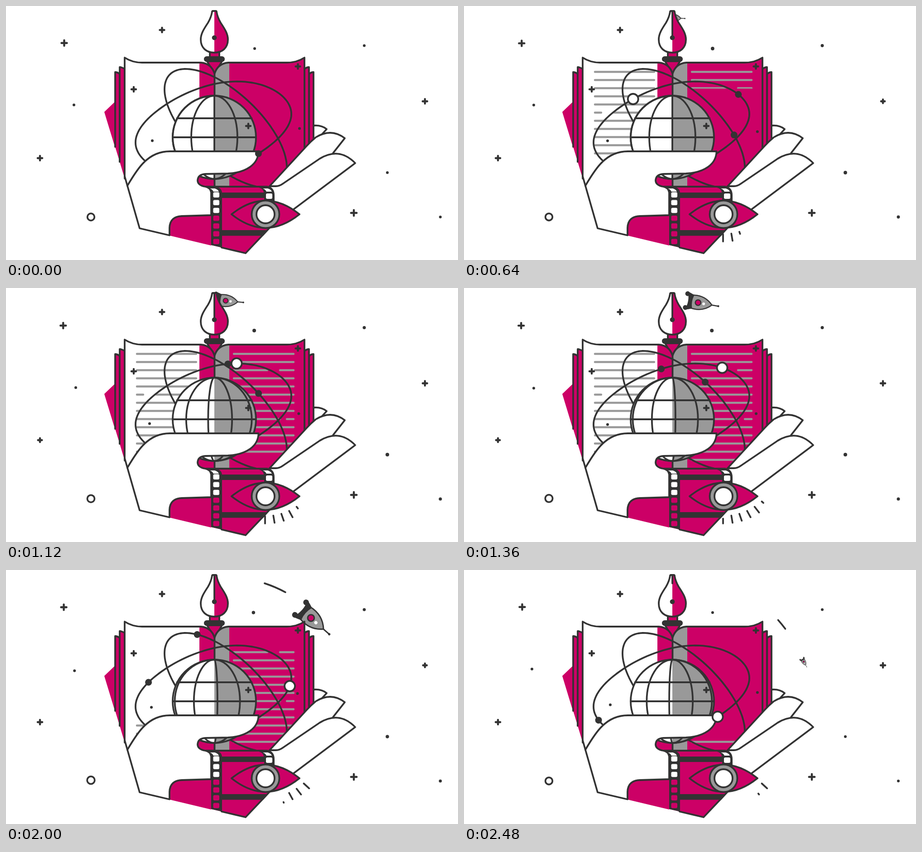
Recreate the animation shown at these times as an HTML page. Size 998 by 561 pixels, loop 2.56 s.

```html
<!DOCTYPE html>
<html lang="en">
<head>
<meta charset="utf-8">
<title>Book, globe and rocket</title>
<style>
html, body { margin: 0; width: 100%; height: 100%; overflow: hidden; background: #fff; }
svg { display: block; width: 100vw; height: 100vh; }
.m { fill: #c06; } .w { fill: #fff; } .g { fill: #999; } .d { fill: #333; }
.s { stroke: #333; stroke-width: 3.8; stroke-linecap: round; stroke-linejoin: round; }
.n { fill: none; }
.text { fill: none; stroke: #999; stroke-width: 4.4; stroke-linecap: round; }
</style>
</head>
<body>
<svg viewBox="0 0 998 561">
  <defs>
    <clipPath id="book"><path d="M240 100H680V293L582 398H240Z"/></clipPath>
    <clipPath id="clipL"><rect id="wipeL" x="280" width="150"/></clipPath>
    <clipPath id="clipR"><rect id="wipeR" x="494" width="150"/></clipPath>
    <clipPath id="past"><rect x="461" y="0" width="537" height="561"/></clipPath>
    <path id="slant" d="M450 403H461Q468 405 470 410H458Q456 405 450 403Z"/>
    <path id="route" d="M440 26C590 26 690 90 757 215"/>
  </defs>

  <!-- rocket, leaving from behind the nib -->
  <path id="trail" class="s n" d="M470 15C590 12 695 75 750 200"/>
  <g clip-path="url(#past)"><g id="rocket">
    <path class="s n" d="M37 0H54" style="stroke-width:3"/>
    <circle class="d" cx="54" r="2.6"/>
    <path class="s g" d="M-18-17Q15-23 37 0Q15 23-18 17Z" style="stroke-width:3"/>
    <path class="d" d="M-31-24Q-22-22-13-18Q-19 0-13 18Q-22 22-31 24L-28 13Q-25 0-28-13Z"/>
    <circle class="d" cx="-31" cy="-18.5" r="6.3"/>
    <circle class="d" cx="-31" cy="18.5" r="6.3"/>
    <circle class="s m" r="7.3" style="stroke-width:3"/>
    <circle class="w" cx="15" cy=".6" r="3.6"/>
  </g></g>

  <!-- pen -->
  <path class="s m" d="M444 122H477L460.5 150Z"/>
  <rect class="s m" x="450" y="102" width="21" height="14"/>
  <rect class="d" x="437" y="111" width="46" height="12.5" rx="6.2"/>
  <path id="nib" class="w" d="M455 13Q455 11 457 11H463Q465 11 465 13Q467 25 474 37C484 52 490 62 490 74C490 92 478 103 460 103C442 103 430 92 430 74C430 62 436 52 446 37Q453 25 455 13Z"/>
  <path class="m" d="M460 11H463Q465 11 465 13Q467 25 474 37C484 52 490 62 490 74C490 92 478 103 460 103Z"/>
  <use href="#nib" class="s" style="fill-opacity:0"/>
  <path id="slit" class="s n"/>
  <circle class="d" cx="460" cy="70" r="5.3"/>

  <!-- book -->
  <path class="m" d="M217 234L241 211V313Z"/>
  <path class="s m" d="M241 311V146Q246 146 251 150V344"/>
  <path class="s m" d="M251 344V135Q256 135 262 139V381"/>
  <path class="s m" d="M679 293V146Q674 146 669 150V303"/>
  <path class="s m" d="M669 303V135Q664 135 659 139V313"/>
  <path class="w" d="M262 383V114Q279 125 300 125H430Q454 127 460.5 150V400H268Z"/>
  <path class="m" d="M659 313V114Q642 125 620 125H491Q467 127 460.5 150V400H582Z"/>
  <path class="m" d="M427 125H430Q454 127 460.5 150V400H440Q423 397 423 385Q424 372 427 371Z"/>
  <path class="g" d="M493 125H491Q467 127 460.5 150V400H493Z"/>
  <g clip-path="url(#book)">
    <g clip-path="url(#clipL)"><path id="linesL" class="text"/></g>
    <g clip-path="url(#clipR)"><path id="linesR" class="text"/></g>
  </g>
  <path class="s n" d="M262 376V114Q279 125 300 125H430Q454 127 460.5 150V398M659 313V114Q642 125 620 125H491Q467 127 460.5 150"/>
  <g clip-path="url(#book)">
    <path id="orbitA" class="s n"/>
    <path id="orbitB" class="s n"/>
    <circle id="dotB" class="d"/>
  </g>

  <!-- globe -->
  <path class="w" d="M460.5 198A92 92 0 0 0 460.5 382Z"/>
  <path class="g" d="M460.5 198A92 92 0 0 1 460.5 382Z"/>
  <path class="s n" d="M368 290A92 92 0 1 1 552 290A92 92 0 1 1 368 290H552M377.5 248H542.5"/>
  <path id="meridians" class="s n"/>

  <!-- fingers -->
  <path class="s w" d="M681 264Q697 263 708 272L696 285"/>
  <path class="s w" d="M582 398L664 309Q673 299 684 290Q718 269 748 292L722 325"/>
  <path class="s w" d="M582 398H596Q604 398 612 392L693 337Q736 311 771 347L635 449"/>

  <!-- sleeve and film -->
  <path class="m" d="M361 507V490Q362 465 388 464L453 462V529Z"/>
  <path class="m" d="M440 399H575Q592 402 592 420V470L582 490L529 546L453 528V405Z"/>
  <path class="s n" d="M476 533.5L529 546L582 490M440 399H576"/>
  <path class="d" d="M470 412H575V424H470ZM470 495H579L568 507.5H470Z"/>
  <path class="d" d="M453 528V414Q453 402 442 399H462Q477 401 477 414V533.6Z"/>
  <path class="d" d="M558 397H576Q593 400 593 418V445H570V416Q569 403 558 401Z"/>
  <use href="#slant" class="w"/>
  <use href="#slant" class="w" x="117"/>
  <rect class="w" x="574" y="414" width="14" height="12" rx="3"/>
  <g id="holes"></g>

  <!-- hand -->
  <path class="s w" d="M557.5 321H362C335 321 318 332 305 345Q291 358 268 397L295 491L361 506.5V490Q362 465 388 464L453 462V412Q451 401 440 399Q423 396 423 385Q424 372 440 371L490 370C530 368 557 350 557.5 321Z"/>
  <path class="s n" d="M262 376L268 397"/>

  <!-- eye -->
  <path class="s m" d="M498 460Q573 400 648 460Q573 520 498 460Z"/>
  <circle class="s g" cx="573" cy="460" r="30.5"/>
  <circle class="s w" cx="573" cy="460" r="20"/>
  <path id="rays" class="s n"/>

  <circle id="dotA" class="d" r="7.5"/>
  <circle id="ball" class="s w"/>
  <path id="plus" class="s n" style="stroke-width:4.4"/>
  <g id="specks"></g>
  <circle id="ring" class="s n" cx="187.5"/>
</svg>
<script>
const LOOP = 2560, STEP = 80, { PI, sin, cos, min, max, sqrt, abs } = Math;
const $ = id => document.getElementById(id);
const set = (id, o) => { for (const k in o) $(id).setAttribute(k, o[k]); };
const clamp = v => max(0, min(1, v));
const rad = a => a * PI / 180;
const repeat = (n, f) => Array.from({ length: n }, (_, i) => f(i)).join('');

// tilted orbits, angle in degrees
const orbitA = a => [458 + 172 * sin(rad(a)), 270 - 100.5 * sin(rad(a + 70.7)) + 3 * cos(rad(3 * a + 144))];
const orbitB = a => [485 + 135 * sin(rad(a)), 270 - 131 * sin(rad(a + 131))];
const trace = f => repeat(120, i => (i ? 'L' : 'M') + f(i * 3).map(v => v.toFixed(1))) + 'Z';
set('orbitA', { d: trace(orbitA) });
set('orbitB', { d: trace(orbitB) });

function textLines(x0, x1, gaps) {
  return repeat(14, i => {
    const gap = gaps[i] ? `H${gaps[i][0]}m${gaps[i][1]} 0` : '';
    return `M${x0} ${145.5 + 18 * i}${gap}H${x1}`;
  });
}
set('linesL', { d: textLines(289, 420, { 5: [303, 29] }) });
set('linesR', { d: textLines(503, 635, { 2: [577, 28], 8: [605, 15] }) });

$('holes').innerHTML = repeat(7, i =>
  `<rect class="${i < 3 ? 'w' : 'm'}" x="457.5" y="${411.3 + 17.2 * i}" width="13.5" height="11.6" rx="3"/>`);

// early and late are the directions of the two halves of a drift
const specks = [
  { x: 549, y: 94, late: [-3, 0], grow: 1 },
  { x: 791, y: 87.5, grow: .5 },
  { x: 150, y: 218.5, early: [4, 0], late: [0, 4.5] },
  { x: 323, y: 297.5, early: [-6, 0], late: [0, 6.5] },
  { x: 648, y: 270.5, early: [0, 7], late: [-5, 0] },
  { x: 842, y: 368, grow: 1 },
  { x: 959, y: 466, grow: .5 }
];
$('specks').innerHTML = repeat(specks.length, i => `<circle id="speck${i}" class="d"/>`);

// the line window slides down at a steady pace
function wipe(id, t, top, bottom) {
  const y = max(130, top + .39 * t);
  set(id, { y, height: max(0, min(420, bottom + .39 * t) - y) });
}

function drawGlobe(t) {
  const p = t / 640 % 1;
  set('meridians', { d: repeat(4, i => {
    const u = (i + p) / 2 - 1, x = 92 * u * (1.216 - .216 * abs(u));
    return `M460 198A${max(.01, abs(x))} 92 0 0 ${x > 0 ? 1 : 0} 460 382`;
  }) });
}

function drawDots(u) {
  const grow = clamp(u * 16);
  const place = (id, [cx, cy], r) => set(id, { cx, cy, r, visibility: r ? 'visible' : 'hidden' });
  place('ball', orbitA(250 * u - 92 - 8 * u ** 6), 11.5 * grow);
  place('dotA', orbitA(138 - 266 * u - 14 * sin(2 * PI * u - .5)), 7.5);
  place('dotB', orbitB(86 - 122 * u - 170 * u ** 9), 7.5 * grow);
}

function drawRocket(t, u) {
  const route = $('route'), far = 18 + 181 * (1 - cos(PI * u ** 2.1));
  const p = route.getPointAtLength(far), q = route.getPointAtLength(far + 2);
  const turn = Math.atan2(q.y - p.y, q.x - p.x) * 180 / PI;
  const fade = clamp((LOOP - t) / 320);
  const size = min(1, .2 + .00047 * t) * fade;
  set('rocket', { transform: `translate(${p.x} ${p.y}) rotate(${turn}) scale(${size})` });

  const head = far - 100, tail = max(0, head - 50 * sqrt(fade));
  set('trail', {
    visibility: head > 0 ? 'visible' : 'hidden',
    'stroke-dasharray': `${max(0, head - tail)} 999`,
    'stroke-dashoffset': -tail
  });
}

function drawRays(t) {
  set('rays', { d: repeat(6, i => {
    const out = clamp((t - 90 - 240 * i) / 240), gone = clamp((t - 1280 - 250 * i) / 240);
    if (out <= gone) return '';
    const a = rad(90 - 9.5 * i), x = 572 + 18.6 * i - .3 * i * i, y = 504 - 1.3 * i * i;
    const at = v => `${x + 16 * v * cos(a)} ${y + 16 * v * sin(a)}`;
    return `M${at(gone)}L${at(out)}`;
  }) });
}

function drawSky(t, u) {
  const wave = sin(PI * u) ** 2;
  const early = min(1, 1.4 * sin(PI * u ** .7) ** 2), late = sin(PI * u * u) ** 2;
  const cross = (x, y, r) => `M${x - r} ${y}h${2 * r}M${x} ${y - r}v${2 * r}`;
  set('plus', {
    d: cross(128.5 - 2.3 * wave, 81.7 + 1.4 * wave, 6) + cross(344.5, 53, 5) +
      cross(282, 184, 5) + cross(644.5, 133.5, 5) + cross(535, 265, 5) +
      cross(925, 210.5, 4.6 + .5 * cos(4 * PI * u)) +
      cross(75, 336, 5.1 - .9 * wave ** 4) + cross(768, 457, 6.2)
  });
  specks.forEach(({ x, y, early: e = [0, 0], late: l = [0, 0], grow = 0 }, i) => set('speck' + i, {
    cx: x + e[0] * early + l[0] * late,
    cy: y + e[1] * early + l[1] * late,
    r: 3 + grow * min(1, 1.8 * wave)
  }));
  set('ring', { cy: 466 - 2 * late, r: 7.8 + .6 * late });
}

function draw(t) {
  const u = t / LOOP;
  wipe('wipeL', t, -446, 91);
  wipe('wipeR', t, -603, -67);
  const tip = 70 - 58 * clamp(t / 560), foot = 70 - 58 * clamp((t - 2270) / 300);
  set('slit', { d: tip < foot ? `M460 ${tip}V${foot}` : '' });
  drawGlobe(t);
  drawDots(u);
  drawRocket(t, u);
  drawRays(t);
  drawSky(t, u);
}

let start;
function tick(now) {
  start ??= now;
  draw(Math.floor((now - start) % LOOP / STEP) * STEP);
  requestAnimationFrame(tick);
}
draw(0);
requestAnimationFrame(tick);
</script>
</body>
</html>
```
